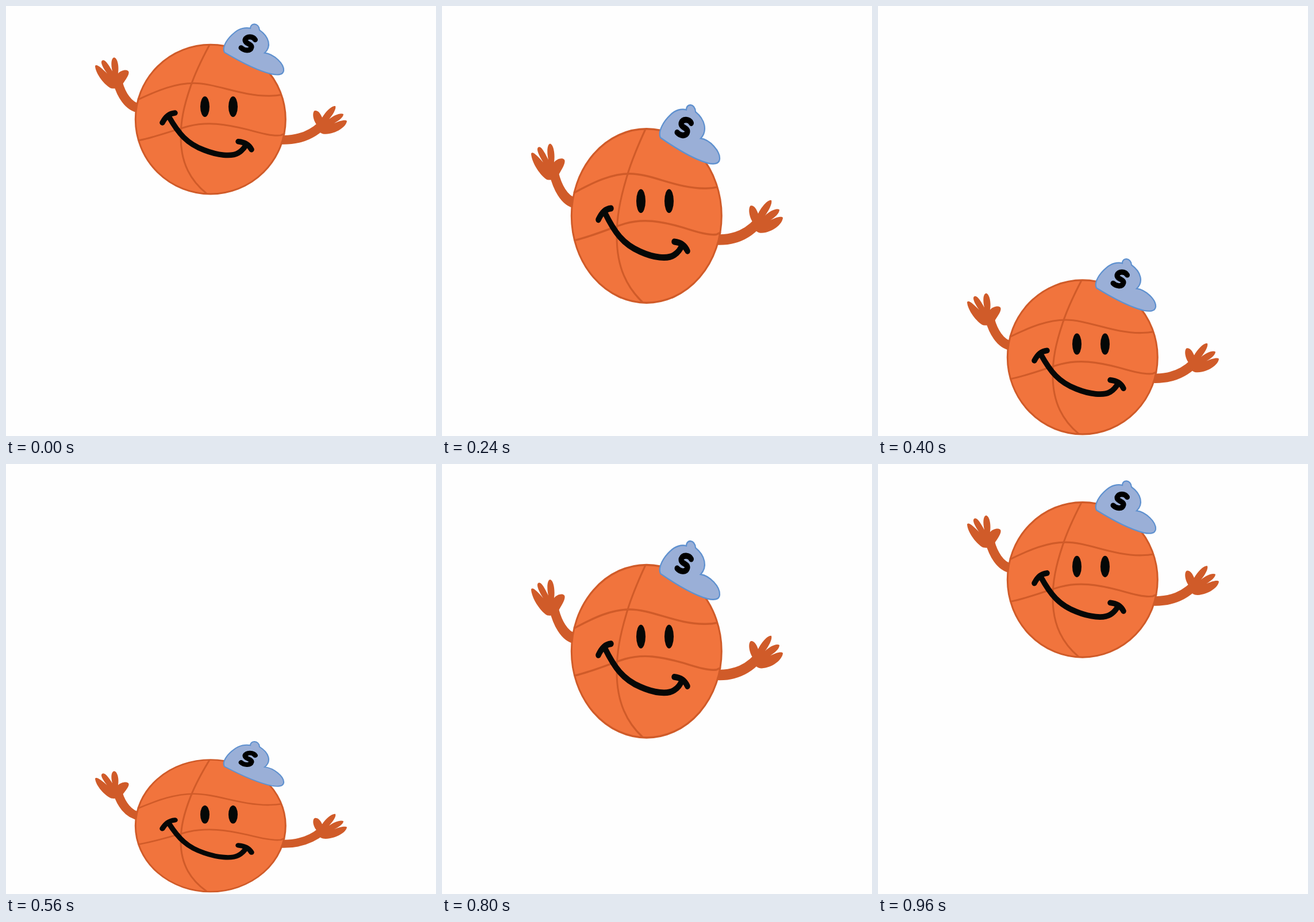
Recreate the animation shown at these times as an HTML page. Size 748 by 748 pixels, loop 1000 ms.

```html
<!DOCTYPE html>
<html lang="en">
<head>
<meta charset="utf-8">
<title>Bouncing ball</title>
<style>
  html, body { margin: 0; width: 100%; height: 100%; overflow: hidden; background: #fefefe; }
  svg { display: block; width: 100%; height: 100%; }
  .line { fill: none; stroke-linecap: round; stroke-linejoin: round; }
  .limb { fill: #d05b29; }
  .arm { stroke: #d05b29; stroke-width: 16; stroke-linecap: butt; }
  .seam { stroke: #d05b29; stroke-width: 3; stroke-linecap: butt; }
  .ink { stroke: #050807; stroke-width: 9.5; }
</style>
</head>
<body>
<svg viewBox="0 0 748 748">
  <g id="ball">
    <path class="line arm" d="M232 178C212 175 200 152 195 134"/>
    <path class="limb" d="M155 104C157 99 166 107 176 117C168 106 163 96 168 94C173 92 179 103 185 113C182 101 183 90 188 89C194 90 197 104 195 117C199 112 209 109 213 113C216 118 207 129 202 137C198 143 190 144 183 143C172 138 156 118 155 104Z"/>
    <path class="line arm" d="M478 233C505 234 530 226 549 208"/>
    <path class="limb" d="M540 206C533 196 533 184 537 182C543 181 547 187 550 194C556 183 568 172 573 174C575 179 568 190 562 197C570 190 582 185 587 188C587 194 578 200 571 204C580 200 590 197 593 200C592 210 575 222 556 223C549 223 546 220 543 216Z"/>
    <circle cx="355.8" cy="197.2" r="130.5" fill="#f1743d" stroke="#d05b29" stroke-width="3"/>
    <path class="line seam" d="M354 67C338 97 327 122 321 140C309 175 304 200 304 228C304 275 322 305 349 327"/>
    <path class="line seam" d="M229 163C265 146 295 134 327 134C365 134 410 157 459 156C467 156 475 155 480 154"/>
    <path class="line seam" d="M231 234C265 227 298 214 318 209C350 201 380 205 420 215C445 222 465 227 478 225L485 222"/>
    <g fill="#050807">
      <ellipse cx="346" cy="175" rx="8" ry="18"/>
      <ellipse cx="395" cy="175" rx="8" ry="18"/>
    </g>
    <path class="line ink" d="M283 192C300 222 315 240 345 251C368 260 392 263 404 256C411 252 414 248 418 241M272 203C278 192 284 187 294 186M404 236C416 237 423 242 427 250"/>
    <path fill="#9aafd7" stroke="#5f91cf" stroke-width="2.2" d="M380 80C375 70 386 55 397 46C406 38 417 36 425 38C425 28 440 28 441 41C458 53 462 70 450 81C466 83 484 100 483 112C482 120 472 120 462 118C437 112 405 95 380 80Z"/>
    <path class="line" stroke="#000" stroke-width="9" d="M433.500 58C430 52 419 51 416 58C415 65 428 65 427 71C425 79 414 77 409 72"/>
  </g>
</svg>
<script>
const ball = document.getElementById("ball");
const LOOP = 1000, STEP = 40, TOP = 197.2, DROP = 435;

const clamp = u => Math.min(1, Math.max(0, u));
const sine = u => (1 - Math.cos(Math.PI * u)) / 2;

// cubic-bezier(.685, 0, .315, 1)
function swing(x) {
  let lo = 0, hi = 1, s;
  for (let i = 0; i < 24; i++) {
    s = (lo + hi) / 2;
    const r = 1 - s;
    if (2.055 * s * r * r + 0.945 * s * s * r + s * s * s < x) lo = s;
    else hi = s;
  }
  return s * s * (3 - 2 * s);
}

function height(t) {
  const fall = swing(clamp((t - 4) / 510));
  const rise = swing(clamp((t - 514) / 500));
  return TOP + DROP * (fall - rise);
}

// [end time, vertical stretch, easing towards it]
const stretches = [
  [0, 0.995],
  [292, 1.172, sine],
  [520, 0.855, sine],
  [745, 1.172, sine],
  [LOOP, 0.995, u => u ** 1.4]
];

function stretch(t) {
  const i = stretches.findIndex(k => k[0] > t);
  const [t0, a] = stretches[i - 1], [t1, b, ease] = stretches[i];
  return a + (b - a) * ease((t - t0) / (t1 - t0));
}

function draw(now) {
  const t = Math.floor((now % LOOP) / STEP) * STEP;
  ball.setAttribute("transform",
    `translate(0 ${height(t)}) scale(1 ${stretch(t)}) translate(0 ${-TOP})`);
}

const start = performance.now();
function tick() {
  draw(performance.now() - start);
  requestAnimationFrame(tick);
}
tick();
</script>
</body>
</html>
```
